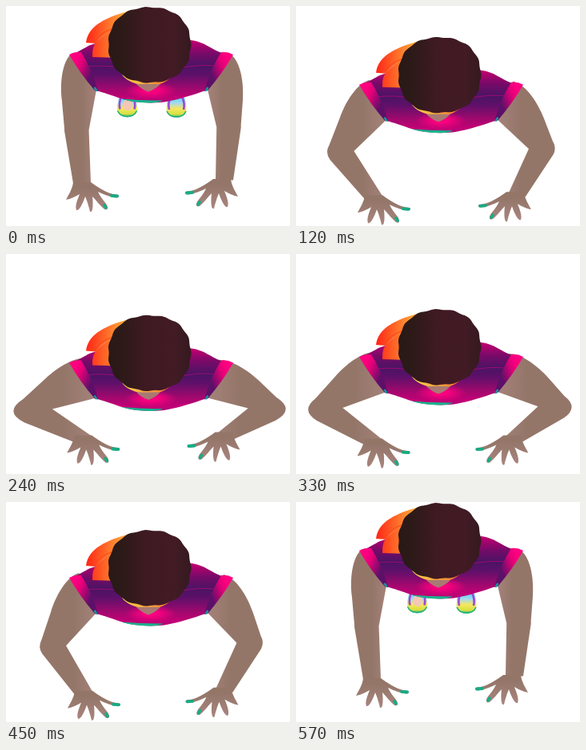
Animation, 355 px wide and 276 px high, one loop 0.6 s. Source, as an HTML page:

```html
<!DOCTYPE html>
<html lang="en">
<head>
<meta charset="utf-8">
<title>Push-ups</title>
<style>
html, body { margin: 0; height: 100%; overflow: hidden; background: #fff; }
svg { display: block; width: 100vw; height: 100vh; }
</style>
</head>
<body>
<svg viewBox="0 0 355 276">
  <defs>
    <linearGradient id="shirt" gradientUnits="userSpaceOnUse" x1="0" y1="44" x2="0" y2="122">
      <stop offset="0" stop-color="#c0006f"/>
      <stop offset=".2" stop-color="#780a69"/>
      <stop offset=".4" stop-color="#4a1464"/>
      <stop offset=".55" stop-color="#60106a"/>
      <stop offset=".78" stop-color="#a4086e"/>
      <stop offset=".92" stop-color="#c40076"/>
      <stop offset="1" stop-color="#a01078"/>
    </linearGradient>
    <linearGradient id="sleeve" gradientUnits="userSpaceOnUse" x1="84" y1="72" x2="108" y2="82">
      <stop offset="0" stop-color="#ff0080"/>
      <stop offset=".35" stop-color="#e40078"/>
      <stop offset="1" stop-color="#5c1068"/>
    </linearGradient>
    <linearGradient id="scarf" gradientUnits="userSpaceOnUse" x1="102" y1="0" x2="160" y2="0">
      <stop offset="0" stop-color="#ff2a18"/>
      <stop offset=".5" stop-color="#ff7a2c"/>
      <stop offset="1" stop-color="#ffc83c"/>
    </linearGradient>
    <linearGradient id="hair">
      <stop offset="0" stop-color="#281916"/>
      <stop offset=".2" stop-color="#2e1a19"/>
      <stop offset=".45" stop-color="#3f1a22"/>
      <stop offset=".8" stop-color="#421b24"/>
      <stop offset="1" stop-color="#341a1f"/>
    </linearGradient>
    <linearGradient id="collar">
      <stop offset="0" stop-color="#ffd84a"/>
      <stop offset=".5" stop-color="#f0a040"/>
      <stop offset="1" stop-color="#ff7a2c"/>
    </linearGradient>
    <linearGradient id="skin">
      <stop offset=".6" stop-color="#947669"/>
      <stop offset="1" stop-color="#a5827a"/>
    </linearGradient>
    <linearGradient id="palm" x2="0" y2="1">
      <stop offset=".2" stop-color="#947669"/>
      <stop offset="1" stop-color="#a9857f"/>
    </linearGradient>
    <radialGradient id="glow">
      <stop offset=".3" stop-color="#f8007e"/>
      <stop offset="1" stop-color="#f8007e" stop-opacity="0"/>
    </radialGradient>
    <linearGradient id="shoe" x2="0" y2="1">
      <stop offset="0" stop-color="#30d8f0"/>
      <stop offset=".35" stop-color="#a8d8f0"/>
      <stop offset=".6" stop-color="#f4e860"/>
      <stop offset=".85" stop-color="#d8e040"/>
      <stop offset="1" stop-color="#20b080"/>
    </linearGradient>

    <g id="hand">
      <path fill="url(#palm)" d="M84 221C83 230 78 237 75 243C81 242 87 239 92 236C89 244 86 251 88 256C91 258 96 248 99 239C102 246 104 254 105 258C109 260 109 248 108 239C113 244 118 251 123 255C128 257 128 252 125 248C121 243 117 238 115 233C123 237 131 240 138 240.5C142 240 142 236.5 138 236.5C128 236 117 229 106 221Z"/>
      <path fill="none" stroke="#18ac84" stroke-width="3.8" stroke-linecap="round" d="M123 250l2 3M132 238l7 .5"/>
    </g>
    <g id="cuff">
      <path fill="url(#sleeve)" d="M79 61Q86 57 94 58Q108 80 115 107L111 106Q92 84 79 61Z"/>
      <path stroke="#1898a0" stroke-width="2.4" d="M110.5 102l3 4.5"/>
    </g>
    <g id="sneaker">
      <path fill="url(#shoe)" d="M-9-14H9Q14 0 12 7Q9 14 0 14Q-9 14-12 7Q-14 0-9-14Z"/>
      <path fill="none" stroke="#9a48d8" stroke-width="2.6" d="M-7-12Q-11-4-9 4M7-12Q11-4 9 4"/>
      <path fill="none" stroke="#20b080" stroke-width="1.6" d="M-12 6Q-9 13 0 13Q9 13 12 6"/>
    </g>
  </defs>

  <use href="#sneaker" transform="translate(151.5 125.5)"/>
  <ellipse cx="152" cy="124" rx="6" ry="7" fill="#f4c8b4"/>
  <use href="#sneaker" transform="translate(213 126)"/>

  <g class="arm"><path fill="url(#skin)"/><use href="#hand"/></g>
  <g class="arm" transform="translate(365) scale(-1 1)"><path fill="url(#skin)"/><use href="#hand"/></g>

  <g id="body">
    <path fill="url(#shirt)" d="M86 59C98 54 102 49 112 47L150 40L232 43C248 45 256 54 270 59L275 75L253 105C240 109 225 115 205 119C195 122 175 122 160 120C145 118 135 112 112 106L92 75Z"/>
    <path fill="none" stroke="#a00a74" d="M101 76Q122 74 140 77M216 78Q240 73 262 75"/>
    <ellipse cx="181" cy="106" rx="32" ry="11" fill="url(#glow)"/>
    <path fill="#18b48c" d="M144 116.5Q170 119 196 118.5Q190 122 178 121.5Q158 121 144 116.5Z"/>
    <use href="#cuff"/>
    <use href="#cuff" transform="translate(363) scale(-1 1)"/>
    <path fill="url(#scarf)" d="M108 64Q107 50 115 43Q124 34 140 27V65Z"/>
    <path fill="url(#scarf)" d="M100 46C103 24 125 14 158 5L150 26Q122 32 112 47Z"/>
    <path fill="none" stroke="#f04a18" d="M110 46Q118 33 132 29"/>
    <path fill="url(#collar)" d="M145 86Q152 97 178 101Q202 98 208 86Z"/>
    <path fill="#a87a72" d="M163 98H193Q186 105 178 107.5Q170 105 163 98Z"/>
    <path id="curls" fill="url(#hair)"/>
  </g>
</svg>
<script>
const STEP = 30, DOWN = 9, UP = 10, DROP = 85;
const $ = s => document.querySelector(s);

const curls = Array.from({ length: 128 }, (_, i) => {
  const a = i / 64 * Math.PI;
  const r = 1 + .04 * Math.sin(2 * a) ** 2 + .012 * Math.cos(15 * a);
  return (179.5 + 51.5 * r * Math.cos(a)).toFixed(1) + ',' + (48.8 + 47.3 * r * Math.sin(a)).toFixed(1);
});
$('#curls').setAttribute('d', 'M' + curls.join('L') + 'Z');

// Both arms share one coordinate system; the right one is mirrored by its group.
const poses = [
  { shoulder: [96, 78], length: 78, rest: 4.4, swing: 59, wrist: [95, 222], drift: () => 2 },
  { shoulder: [97, 80], length: 72, rest: 7, swing: 57, wrist: [92, 218], drift: down => down ? -4 : -.5 }
];
const arms = [...document.querySelectorAll('.arm')].map((group, i) =>
  ({ ...poses[i], skin: group.children[0], hand: group.children[1] }));

const along = ([x, y], [nx, ny], d) => [x + nx * d, y + ny * d];

function poseArm(arm, p, down) {
  const lift = 4 * p * (1 - p);
  const hx = arm.drift(down) * Math.sqrt(lift), hy = 16.5 * lift;
  const [sx, y0] = arm.shoulder, sy = y0 + DROP * p;
  const a = (arm.rest + arm.swing * p) * Math.PI / 180;
  const sin = Math.sin(a), cos = Math.cos(a);
  // Point beside the upper arm: x across the bone, y down it
  const upper = (x, y) => [sx + x * cos - y * sin, sy + x * sin + y * cos];

  const elbow = upper(0, arm.length);
  const wrist = [arm.wrist[0] + hx, arm.wrist[1] + hy];
  const dx = wrist[0] - elbow[0], dy = wrist[1] - elbow[1], reach = Math.hypot(dx, dy);
  const n1 = [-cos, -sin], n2 = [-dy / reach, dx / reach];
  const dot = n1[0] * n2[0] + n1[1] * n2[1];
  const miter = [(n1[0] + n2[0]) / (1 + dot), (n1[1] + n2[1]) / (1 + dot)];

  arm.skin.setAttribute('d', [
    'M', upper(-15, -18),
    'C', upper(-27, -6), upper(-27, 22), upper(-23, 42),
    'L', along(elbow, n1, 17),
    'Q', along(elbow, miter, 17), along(elbow, n2, 17),
    'L', along(wrist, n2, 11), [wrist[0] + 11, wrist[1]],
    along(elbow, miter, -13.5), [113, 105 + DROP * p], [sx, sy - 8], 'Z'
  ].join(' '));
  arm.hand.setAttribute('transform', `translate(${hx} ${wrist[1] - 222})`);
}

function draw(now) {
  const k = Math.floor(now / STEP) % (DOWN + UP + 1);
  const down = k <= DOWN;
  const p = down ? k / DOWN : (DOWN + UP - k) / UP;
  $('#body').setAttribute('transform', `translate(0 ${DROP * p})`);
  arms.forEach(arm => poseArm(arm, p, down));
}

let start;
function tick(now) {
  start ??= now;
  draw(now - start);
  requestAnimationFrame(tick);
}
draw(0);
requestAnimationFrame(tick);
</script>
</body>
</html>
```
